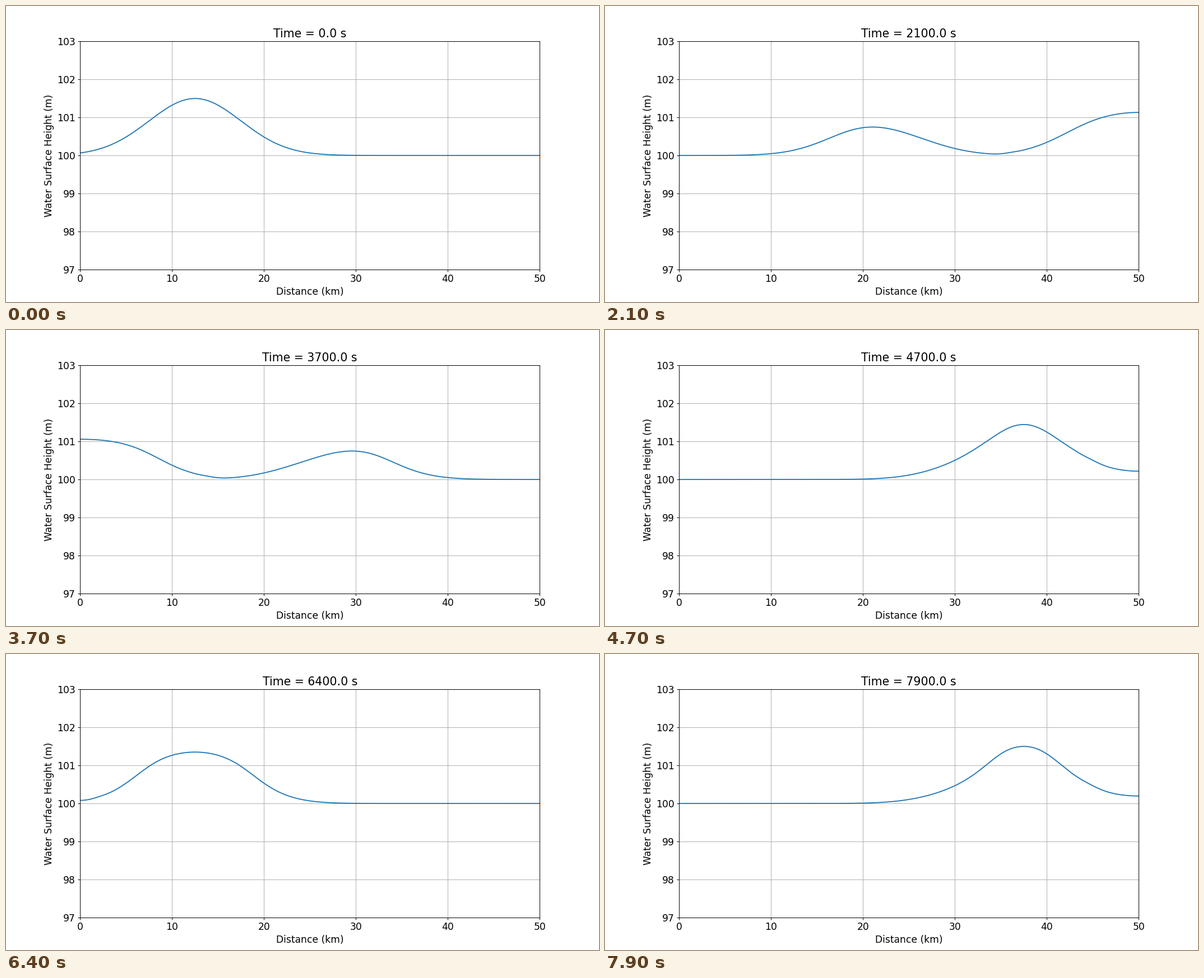
A matplotlib script for the animation above (8000 ms loop, 1058 by 529 pixels).

```python
import numpy as np
import matplotlib.pyplot as plt
from matplotlib.animation import FuncAnimation

G = 9.81          # m/s^2
DEPTH = 100.0     # m
LENGTH = 50e3     # m
DX, DT = 100.0, 2.0
FRAMES, FRAME_TIME = 80, 100.0

x = np.arange(0, LENGTH + DX / 2, DX)


def flux(q):
    h, hu = q
    return np.array([hu, hu ** 2 / h + G * h ** 2 / 2])


def with_walls(q):
    """Add mirrored ghost points: even height, odd momentum."""
    flip = np.array([[1.0], [-1.0]])
    return np.hstack([flip * q[:, 1:2], q, flip * q[:, -2:-1]])


def step(q):
    """One two-step Lax-Wendroff update of the shallow water equations."""
    p = with_walls(q)
    f = flux(p)
    half = (p[:, 1:] + p[:, :-1]) / 2 - DT / (2 * DX) * (f[:, 1:] - f[:, :-1])
    q = q - DT / DX * np.diff(flux(half), axis=1)
    q[1, [0, -1]] = 0
    return q


def simulate():
    bump = 1.5 * np.exp(-((x - LENGTH / 4) / 5e3) ** 2 / 2)
    q = np.array([DEPTH + bump, np.zeros_like(x)])
    heights = [q[0]]
    for _ in range(FRAMES - 1):
        for _ in range(int(FRAME_TIME / DT)):
            q = step(q)
        heights.append(q[0])
    return heights


heights = simulate()

plt.rcParams.update({"font.family": "DejaVu Sans", "font.size": 14})
fig, ax = plt.subplots(figsize=(12, 6), dpi=1058 / 12)
line, = ax.plot(x / 1e3, heights[0], color="#1f77b4", lw=1.5)
ax.set_xlim(0, 50)
ax.set_ylim(97, 103)
ax.set_xlabel("Distance (km)")
ax.set_ylabel("Water Surface Height (m)")
ax.grid(True)
title = ax.set_title("Time = 0.0 s")


def update(i):
    line.set_ydata(heights[i])
    title.set_text(f"Time = {i * FRAME_TIME:.1f} s")
    return line, title


anim = FuncAnimation(fig, update, frames=FRAMES, interval=100,
                     repeat=True, repeat_delay=0, blit=False)
plt.show()
```
